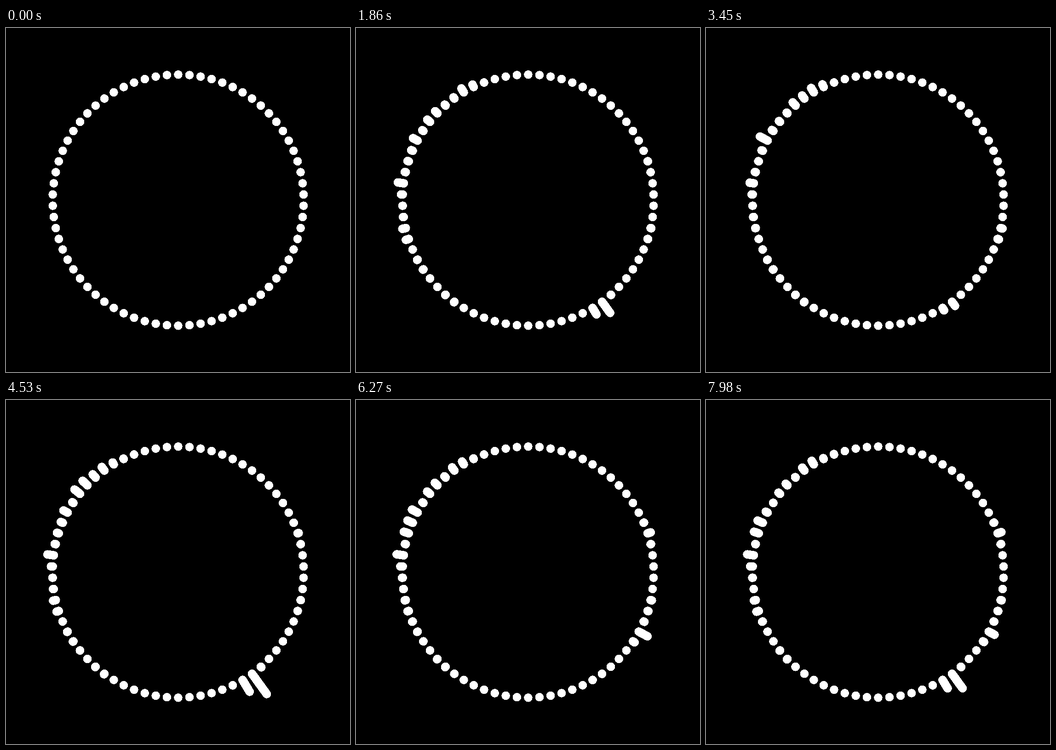
These frames come from a looping animation (748x748 px, 8000 ms). An HTML page:

```html
<!DOCTYPE html>
<html lang="en">
<head>
<meta charset="utf-8">
<title>Ring spectrum</title>
<style>
  html, body { margin: 0; width: 100%; height: 100%; overflow: hidden; background: #000; }
  svg { display: block; width: 100%; height: 100%; }
  path { fill: none; stroke: #fff; stroke-width: 18.6; stroke-linecap: round; shape-rendering: crispEdges; }
</style>
</head>
<body>
<svg viewBox="0 0 748 748"><path id="ring"/></svg>
<script>
const LOOP = 8000, STEP = 30;
const BARS = 70, CX = 374.4, CY = 374.3, R = 273;
const ring = document.getElementById('ring');

// Two plucked bass strings: when each is hit, and how hard
const strings = [
  { pos: 28.35, hits: [[1080, 68], [1620, 60], [2250, 72], [2970, 60], [3720, 106], [4290, 112], [4830, 117], [7890, 50]] },
  { pos: 23.1, hits: [[240, 40], [5400, 38], [5820, 80], [6750, 86], [7620, 38]] }
];

// Voices that swell and fade; each is silent at `rest` and every `period` ms from there
const voices = [
  { pos: 14, peak: 9, rest: 2800, period: 10000 },
  { pos: 20.4, peak: 7, rest: 1000, period: 4000 },
  { pos: 49.5, peak: 15, rest: 3450, period: 3510 },
  { pos: 53.8, peak: 17, rest: 2400, period: 1560 },
  { pos: 56.5, peak: 21, rest: 3000, period: 8000 },
  { pos: 58, peak: 20, rest: 2770, period: 1360 },
  { pos: 60.5, peak: 27, rest: 2850, period: 4400 },
  { pos: 62.4, peak: 15, rest: 700, period: 7000 },
  { pos: 63.5, peak: 18, rest: 2500, period: 11000 },
  { pos: 64.4, peak: 18, rest: 2450, period: 1900 }
];

const pluck = (age, attack = 90, decay = 260) =>
  age < 0 ? 0 : age < attack ? age / attack : Math.exp((attack - age) / decay);

function levels(t) {
  const out = new Array(BARS).fill(0);
  // Each note leaks into the neighbouring bars
  const add = (pos, level) => {
    for (let k = Math.floor(pos) - 2; k <= pos + 3; k++) {
      out[k] += level * Math.exp(-2 * (k - pos) ** 2);
    }
  };

  for (const { pos, hits } of strings) {
    for (const [start, level] of hits) add(pos, level * pluck(t - start));
  }

  const fade = Math.min(1, t / 300);
  voices.forEach(({ pos, peak, rest, period }, i) => {
    const swell = Math.sin(Math.PI * (t - rest) / period) ** 2;
    const flutter = 0.85 + 0.15 * Math.sin(t / 70 + i * 2);
    add(pos, fade * peak * swell * flutter);
  });

  // Faint shimmer past the bass
  for (let k = 42; k < 67; k++) {
    out[k] += fade * 1.5 * Math.sin(t / 170 + k * 2.4) ** 2;
  }
  return out;
}

function draw(t) {
  ring.setAttribute('d', levels(t).map((len, k) => {
    const a = k / BARS * 2 * Math.PI, sx = Math.sin(a), sy = -Math.cos(a);
    const at = r => (CX + r * sx).toFixed(2) + ' ' + (CY + r * sy).toFixed(2);
    return 'M' + at(R) + 'L' + at(R + Math.max(0.02, len));
  }).join(''));
}

const origin = performance.now();
function tick() {
  const t = (performance.now() - origin) % LOOP;
  draw(Math.floor(t / STEP) * STEP);
  requestAnimationFrame(tick);
}
draw(0);
requestAnimationFrame(tick);
</script>
</body>
</html>
```
